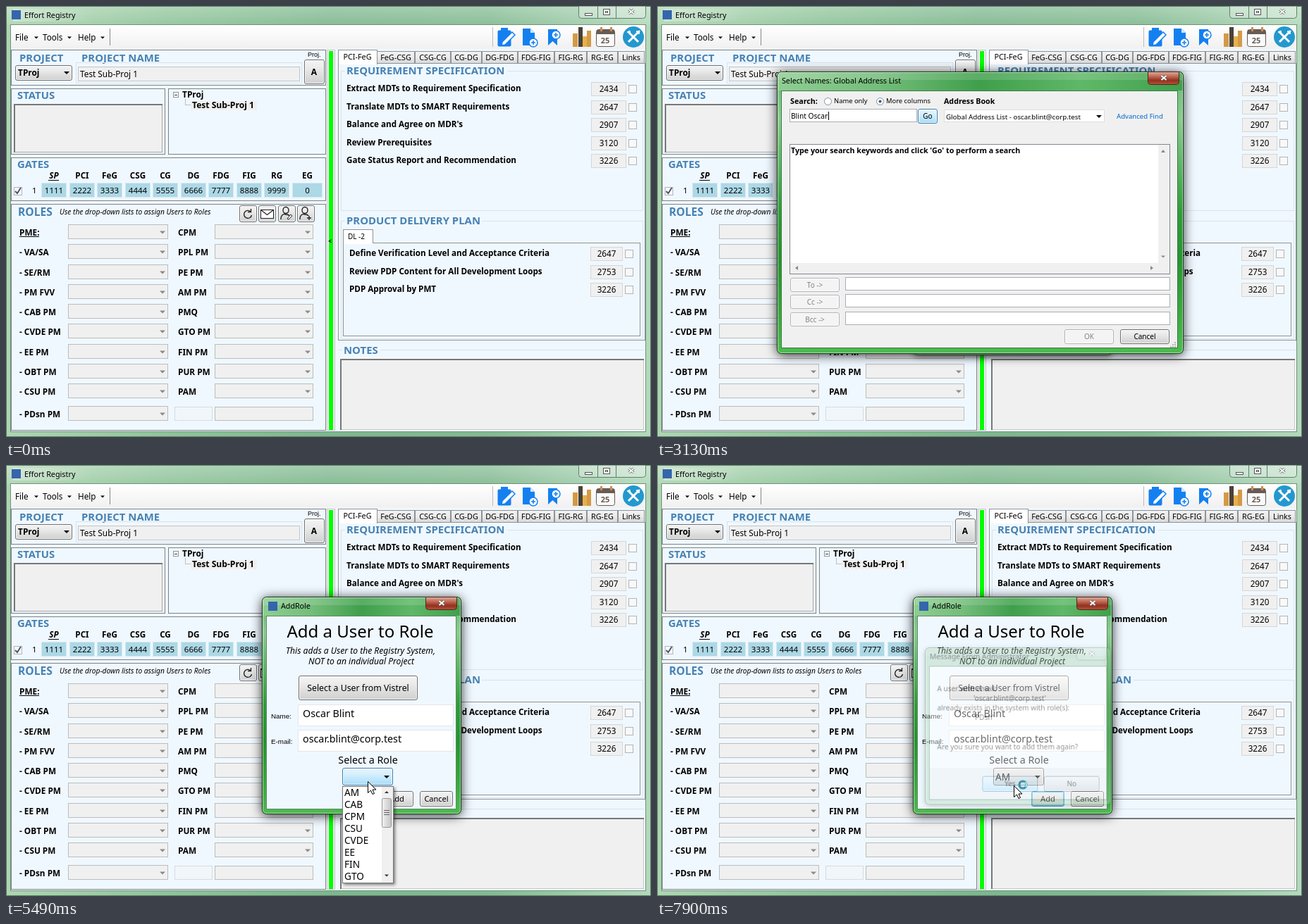
Write an HTML page with a canvas that moves like this. It is 915 px wide and 612 px high and loops after 7.99 s.

```html
<!DOCTYPE html>
<html lang="en">
<head>
<meta charset="utf-8">
<title>Effort Registry</title>
<style>
html, body { margin: 0; width: 100%; height: 100%; overflow: hidden; }
canvas { display: block; }
</style>
</head>
<body>
<canvas id="stage" width="915" height="612"></canvas>
<script>
const W = 915, H = 612, LOOP = 7990;
const stage = document.getElementById('stage').getContext('2d');
const layer = new OffscreenCanvas(W, H).getContext('2d');
let c = stage;

const NAME = 'Oscar Blint', SEARCH = 'Blint Oscar', MAIL = 'oscar.blint@corp.test';
const BLUE = '#4682b4', ALICE = '#f0f8ff', GRAY = '#f0f0f0';
const clamp = v => Math.max(0, Math.min(1, v));
const ramp = (t, from, to) => clamp((t - from) / (to - from));

// ---------- drawing helpers ----------
function box(x, y, w, h, fill, line) {
  if (fill) { c.fillStyle = fill; c.fillRect(x, y, w, h); }
  if (line) { c.strokeStyle = line; c.lineWidth = 1; c.strokeRect(x + .5, y + .5, w - 1, h - 1); }
}
function round(x, y, w, h, r, fill, line) {
  c.beginPath();
  c.roundRect(x + .5, y + .5, w - 1, h - 1, r);
  if (fill) { c.fillStyle = fill; c.fill(); }
  if (line) { c.strokeStyle = line; c.lineWidth = 1; c.stroke(); }
}
function path(d, x, y, fill, line, width = 1) {
  const p = new Path2D(d);
  c.save();
  c.translate(x, y);
  if (fill) { c.fillStyle = fill; c.fill(p); }
  if (line) { c.strokeStyle = line; c.lineWidth = width; c.stroke(p); }
  c.restore();
}
// y is the middle of the capitals
function text(s, x, y, size, style = '', color = '#000', align = 'left', family = '"Noto Sans"') {
  c.font = `${style} ${size}px ${family}, sans-serif`;
  c.fillStyle = color;
  c.textAlign = align;
  c.fillText(s, x, y + size * .36);
}
const bold = (s, x, y, size = 11.7, color, align) => text(s, x, y, size, 'bold', color, align);
const mid = (s, x, y, size, style, color) => text(s, x, y, size, style, color, 'center');
const head = (s, x, y, size = 14.9) => bold(s, x, y, size, BLUE);

function shade(x0, y0, x1, y1, colors) {
  const g = c.createLinearGradient(x0, y0, x1, y1);
  colors.forEach((col, i) => g.addColorStop(i / (colors.length - 1), col));
  return g;
}
const down = (x, y, s = 4, color = '#000') => path(`M${-s} 0H${s}L0 ${s}Z`, x, y - s / 2, color);
const check = (x, y) => box(x, y, 12, 12, '#f8f8f8', '#b4b4b4');

const TONES = {
  normal: [['#f4f4f4', '#ebebeb', '#dcdcdc', '#cfcfcf'], '#707070'],
  focus: [['#f4f4f4', '#ebebeb', '#dcdcdc', '#cfcfcf'], '#3c9fd1'],
  hot: [['#eaf6fd', '#d9f0fc', '#bee6fd', '#a7d9f5'], '#3c7fb1'],
  off: [['#f4f4f4', '#f4f4f4'], '#b2b5b8']
};
function button(x, y, w, h, label, size, tone = 'normal') {
  const [fill, line] = TONES[tone];
  round(x, y, w, h, 2.5, shade(0, y, 0, y + h, fill), line);
  round(x + 1, y + 1, w - 2, h - 2, 2, null, tone == 'focus' ? '#4cc4ee' : 'rgba(255,255,255,.75)');
  if (label) mid(label, x + w / 2, y + h / 2, size, '', tone == 'off' ? '#838383' : '#000');
}
function combo(x, y, w, h = 21) {
  box(x, y, w, h, GRAY, '#bcbcbc');
  down(x + w - 8, y + h / 2 + 1, 4, '#8a8a8a');
}
function cross(x, y, color) {
  path('M-3.5 -3L3.5 3M3.5 -3L-3.5 3', x, y, null, '#555', 3.4);
  path('M-3.5 -3L3.5 3M3.5 -3L-3.5 3', x, y, null, color, 2);
}

// ---------- main window ----------
function toolbar() {
  const blue = '#1480f0';
  round(697, 34, 20, 24, 2, blue);
  box(702, 31, 10, 5, blue);
  path('M0 0L14 -14L18 -10L4 4L-1 5Z', 704, 51, '#fff', blue, 1.5);
  path('M0 0H11L17 6V24H0Z', 733, 32, blue);
  path('M11 0V6H17Z', 733, 32, '#cfe6ff');
  const plus = (x, y) => {
    path('M6 0A6 6 0 1 1 -6 0A6 6 0 1 1 6 0', x, y, '#fff', blue, 1.5);
    path('M-3 0H3M0 -3V3', x, y, null, blue, 1.6);
  };
  plus(748, 52);
  path('M0 0H13V23L6.5 17L0 23Z', 769, 33, blue);
  plus(780, 41);
  box(804, 39, 7, 19, '#d49a45');
  box(812, 30, 6, 28, '#4a4138');
  box(818, 43, 6, 15, '#e6b04c');
  box(824, 35, 6, 23, '#d49a45');
  round(837, 33, 27, 25, 3, '#fafafa', '#665c55');
  box(838, 34, 25, 6, '#665c55');
  for (const x of [843, 857]) box(x, 30, 3, 6, '#d08a50');
  mid('25', 850, 49, 11, 'bold', '#665c55');
  path('M15 0A15 15 0 1 1 -15 0A15 15 0 1 1 15 0', 890, 44, '#2398cf');
  path('M-7 7L6 -6M-6 -6L7 7', 890, 44, null, '#fff', 3);
  path('M-9 -7L-5 -9L-4 -4ZM4 -8L9 -9L8 -4Z', 890, 44, '#fff', '#fff', 1);
}

function shell(active) {
  box(0, 0, W, H, shade(0, 0, W, 0, ['#aed5b2', '#8fc49a', '#7db78d', '#82ba91', '#b4d9bc']));
  box(0, 0, W, 27, shade(0, 0, 0, 27, ['rgba(255,255,255,.3)', 'rgba(255,255,255,.08)']));
  box(10, 4, 110, 18, shade(10, 0, 125, 0, ['rgba(255,255,255,.3)', 'rgba(255,255,255,0)']));
  if (active) box(0, 0, W, H, `rgba(30,140,45,${.4 * active})`);
  box(0, 0, W, H, null, '#587963');
  box(6, 26, 902, 579, ALICE, '#6f9279');
  box(8, 6, 13, 13, '#3565ac');
  text('Effort Registry', 26, 13, 10.8);
  round(812, -4, 96, 22, 4, 'rgba(255,255,255,.28)', '#60806a');
  if (active) box(866, 0, 41, 17, `rgba(190,65,45,${active})`);
  path('M27 0V17M53 0V17', 812.5, 0, null, '#60806a');
  box(821, 10, 11, 4, '#fff', '#555');
  box(847, 4, 10, 9, '#fff', '#555');
  box(850, 7, 4, 3, null, '#555');
  cross(887, 8, '#fff');

  box(7, 27, 900, 34, shade(0, 27, 0, 61, ['#fff', '#f8f8f8', '#f0f0f0']));
  [['File', 13, 43], ['Tools', 52, 90], ['Help', 102, 137]].forEach(([s, x, a]) => {
    text(s, x, 45, 11.7);
    down(a, 45, 3);
  });
  box(147, 32, 1, 24, '#888');
  box(690, 30, 1, 28, '#bbb');
  toolbar();
}

function leftSide(hover) {
  const line = '#7c8288';
  box(7, 62, 447, 51, null, line);
  head('PROJECT', 19, 74);
  head('PROJECT NAME', 107, 74);
  button(13, 84, 81, 22);
  bold('TProj', 17, 95, 11.9);
  down(86, 95);
  box(99, 80, 321, 30, null, '#dbe3ea');
  box(102, 86, 315, 21, GRAY, '#c5c5c5');
  text('Test Sub-Proj 1', 105, 97, 11.8);
  text('Proj.', 428, 69, 9, '', '#000', 'left', '"Liberation Sans"');
  button(423, 76, 29, 35);
  bold('A', 437, 94, 12, '#000', 'center');

  box(7, 117, 219, 94, null, line);
  head('STATUS', 16, 127);
  box(11, 139, 211, 69, GRAY, '#a5a5a5');
  box(11, 139, 211, 2, '#777');
  box(11, 139, 2, 69, '#777');
  box(230, 117, 224, 94, ALICE, line);
  box(237, 122, 8, 8, '#fff', '#929292');
  box(239, 126, 4, 1, '#333');
  bold('TProj', 250, 126, 11.9);
  c.setLineDash([1, 1]);
  path('M0 0V8H7', 254.5, 132.5, null, '#888');
  c.setLineDash([]);
  box(262, 135, 94, 13, GRAY);
  bold('Test Sub-Proj 1', 264, 141, 12.1);

  box(7, 215, 447, 62, null, line);
  head('GATES', 16, 225);
  check(11, 257);
  path('M0 3L3 6L8 -2', 13, 260, null, '#40506a', 1.8);
  text('1', 37, 262, 11.5);
  'SP PCI FeG CSG CG DG FDG FIG RG EG'.split(' ').forEach((s, i) => {
    const x = Math.round(50 + i * 39.55), w = i == 9 ? 43 : 36;
    mid(s, x + w / 2, 241, 11.7, i ? 'bold' : 'italic bold');
    if (!i) box(60, 247, 15, 1, '#000');
    box(x, 251, w, 21, '#add8e6', '#d3e9f1');
    mid(i == 9 ? '0' : String(i + 1).repeat(4), x + w / 2, 262, 11.5);
  });

  box(7, 281, 447, 322, null, line);
  head('ROLES', 17, 292, 15.6);
  text('Use the drop-down lists to assign Users to Roles', 76, 292, 10.2, 'italic');
  for (let i = 0; i < 4; i++) button(Math.round(331 + i * 27.3), 283, 25, 24, '', 0, hover == i ? 'hot' : 'normal');
  path('M4 -3A5.5 5.5 0 1 0 5.5 2M4.5 -7V-2.5H0', 343, 295, null, '#222', 1.4);
  box(361, 289, 19, 13, '#fff', '#222');
  path('M0 0L9 7L18 0', 361.5, 289.5, null, '#222', 1.2);
  for (const x of [397, 424])
    path('M4 -4A4 4.5 0 1 1 -4 -4A4 4.5 0 1 1 4 -4M-7 9C-7 2 -3 1 0 2C2 2 4 2 5 4', x, 294, null, '#222', 1.4);
  path('M0 6L5 0L7 2L2 7Z', 399, 296, '#fff', '#222');
  path('M0 3H6M3 0V6', 427, 298, null, '#222', 1.4);

  const left = ['PME:', 'VA/SA', 'SE/RM', 'PM FVV', 'CAB PM', 'CVDE PM', 'EE PM', 'OBT PM', 'CSU PM', 'PDsn PM'];
  const right = ['CPM', 'PPL PM', 'PE PM', 'AM PM', 'PMQ', 'GTO PM', 'FIN PM', 'PUR PM', 'PAM'];
  left.forEach((s, i) => {
    const y = Math.round(321 + i * 28.25) + (i == 9 ? 4 : 0);
    bold(i ? '- ' + s : s, 19, y + 1, 11.8);
    combo(88, y - 11, 142);
    if (i < 9) {
      bold(right[i], 244, y + 1, 11.8);
      combo(296, y - 11, 140);
    }
  });
  box(19, 327, 28, 1, '#000');
  box(239, 569, 54, 20, '#f1f6fb', '#d5dce2');
  box(296, 569, 140, 20, GRAY, '#bcbcbc');

  box(455, 62, 12, 541, '#f4f4f4', '#c4c4c4');
  box(458, 64, 6, 538, '#00ff00');
  bold('<', 457, 334, 9);
}

function task(label, value, x, y, boxX, boxY, w) {
  bold(label, x, y, 11.65);
  box(boxX, boxY - 10, w, 20, GRAY, '#d6d6d6');
  mid(value, boxX + w / 2, boxY, 11.7);
  check(boxX + w + 3, boxY - 6);
}

function rightSide() {
  box(471, 81, 436, 394, ALICE, '#8d9399');
  const tabs = ['PCI-FeG', 'FeG-CSG', 'CSG-CG', 'CG-DG', 'DG-FDG', 'FDG-FIG', 'FIG-RG', 'RG-EG', 'Links'];
  const edges = [471, 526, 580, 631, 675, 726, 778, 824, 868, 906];
  tabs.forEach((s, i) => {
    const x = edges[i], w = edges[i + 1] - x;
    if (i) box(x, 64, w, 18, shade(0, 64, 0, 82, ['#f3f3f3', '#ebebeb', '#d6d6d6']), '#8d9399');
    else {
      box(x, 62, w + 1, 21, '#fff', '#8d9399');
      box(x + 1, 81, w - 1, 2, '#fff');
    }
    mid(s, x + w / 2, i ? 73 : 72, 10.8);
  });
  box(475, 92, 429, 199, null, '#dbe3ea');
  box(481, 86, 230, 12, ALICE);
  head('REQUIREMENT SPECIFICATION', 483, 92);
  [['Extract MDTs to Requirement Specification', 2434], ['Translate MDTs to SMART Requirements', 2647],
   ["Balance and Agree on MDR's", 2907], ['Review Prerequisites', 3120],
   ['Gate Status Report and Recommendation', 3226]].forEach(([s, n], i) =>
    task(s, n, 483, 117 + i * 25.5, 830, Math.round(118 + i * 25.5), 50));

  box(475, 305, 429, 168, null, '#dbe3ea');
  box(481, 299, 194, 12, ALICE);
  head('PRODUCT DELIVERY PLAN', 483, 305);
  box(478, 336, 422, 133, ALICE, '#8d9399');
  box(478, 317, 43, 20, '#fff', '#8d9399');
  box(479, 335, 41, 3, '#fff');
  mid('DL -2', 497, 327, 10);
  [['Define Verification Level and Acceptance Criteria', 2647],
   ['Review PDP Content for All Development Loops', 2753], ['PDP Approval by PMT', 3226]].forEach(([s, n], i) =>
    task(s, n, 487, 351 + i * 25.5, 829, Math.round(352 + i * 25.5), 46));

  box(472, 488, 434, 1, '#dbe3ea');
  box(477, 483, 54, 12, ALICE);
  head('NOTES', 479, 489);
  box(474, 501, 431, 101, GRAY, '#c8c8c8');
  box(474, 501, 431, 2, '#777');
  box(474, 501, 2, 101, '#777');
}

// ---------- pop-up windows ----------
function frame(x, y, w, h, title, active, closeTone, icon) {
  c.save();
  c.beginPath();
  c.rect(0, 0, W, H);
  c.roundRect(x, y, w, h, 6);
  c.clip('evenodd');
  c.shadowColor = active ? 'rgba(0,0,0,.85)' : 'rgba(0,0,0,.5)';
  c.shadowBlur = active ? 16 : 9;
  c.shadowOffsetY = 2;
  round(x, y, w, h, 6, '#000');
  c.restore();

  c.save();
  c.beginPath();
  c.roundRect(x, y, w, h, 6);
  c.clip();
  c.filter = 'blur(2px)';
  c.drawImage(stage.canvas, x, y, w, h, x, y, w, h);
  c.filter = 'none';
  const tint = active ? ['#67b873', '#8bcc8f', '#5cb565', '#2f9c38', '#279331', '#37a63c', '#4fbb50']
                      : ['rgba(150,198,155,.8)', 'rgba(165,210,170,.8)', 'rgba(160,206,167,.8)'];
  box(x, y, w, h, shade(0, y, 0, y + h, tint));
  if (active) box(x, y, w, 27, shade(x, 0, x + w, 0, ['#8fce93', '#74bd7b', '#3f9f4b', '#5fb868', '#3f9f4b']));
  box(x, y, w, 12, 'rgba(255,255,255,.14)');
  c.restore();
  round(x, y, w, h, 6, null, active ? '#16381c' : '#4f6f57');
  round(x + 1, y + 1, w - 2, h - 2, 5, null, 'rgba(225,255,225,.6)');

  if (icon) box(x + 9, y + 7, 13, 13, '#3565ac');
  text(title, x + (icon ? 27 : 7), y + 13, 10.7);
  const cx = x + w - 51, red = ['#dfb0a0', '#c4705c', '#93301f', '#b9573d'];
  const fills = { red, tan: ['#c9c09a', '#b09a72', '#98794f', '#b59a70'], clear: ['rgba(255,255,255,.35)', 'rgba(255,255,255,.1)'] };
  round(cx, y, 45, 19, [0, 0, 4, 4], shade(0, y, 0, y + 19, fills[closeTone]), closeTone == 'clear' ? '#6d8d73' : '#4b2a20');
  cross(cx + 23, y + 9, closeTone == 'tan' ? '#ddd6c0' : '#fff');
}

function addRole(s) {
  frame(363, 187, 283, 309, 'AddRole', s.active, s.active ? 'red' : 'clear', true);
  box(369, 214, 270, 275, ALICE, '#5d8a63');
  mid('Add a User to Role', 502.5, 236, 24);
  mid('This adds a User to the Registry System,', 503, 264, 12.1, 'italic');
  mid('NOT to an individual Project', 504, 279, 12.1, 'italic');
  button(415, 299, 169, 35, 'Select a User from Vistrel', 12.3, s.pick);
  [['Name:', 356, s.filled && NAME], ['E-mail:', 392, s.filled && MAIL]].forEach(([label, y, value]) => {
    text(label, 376, y, 9.8, '', '#000', 'left', '"Liberation Sans"');
    box(414, y - 16, 221, 31, '#fff', '#e2e6ea');
    if (value) text(value, 421, y - 3, 14.3);
  });
  mid('Select a Role', 513.5, 419, 14.3);
  button(477, 430, 72, 25, '', 0, s.open ? 'hot' : 'normal');
  if (s.role) text('AM', 480, 443, 13.6);
  down(540, 443);
  button(531, 463, 47, 22, 'Add', 11.2, s.add);
  button(587, 463, 47, 22, 'Cancel', 11);
  if (s.open) roleList(s.over);
}

function roleList(over) {
  c.save();
  c.shadowColor = 'rgba(0,0,0,.5)';
  c.shadowBlur = 4;
  c.shadowOffsetX = c.shadowOffsetY = 2;
  box(477, 456, 73, 138, '#fff');
  c.restore();
  box(477, 456, 73, 138, null, '#777');
  if (over) box(478, 457, 55, 16, '#3399ff');
  'AM CAB CPM CSU CVDE EE FIN GTO'.split(' ').forEach((s, i) =>
    text(s, 480, 465 + i * 17, 13.6, '', over && !i ? '#fff' : '#000'));
  box(533, 457, 16, 136, GRAY);
  round(533, 473, 14, 42, 2, shade(533, 0, 547, 0, ['#f5f5f5', '#dadada', '#c4c4c4']), '#979797');
  for (const y of [490, 493, 496]) box(536, y, 8, 1, '#666');
  path('M-3 2H3L0 -1Z', 540, 464, '#333');
  down(540, 583, 3, '#333');
}

function addressBook(t) {
  const found = t > 3230, chosen = t > 3450;
  frame(170, 93, 577, 401, 'Select Names: Global Address List', true, 'red');
  box(176, 120, 563, 366, GRAY, '#3d7a45');
  bold('Search:', 189, 135, 10.7);
  [['Name only', 242], ['More columns', 316]].forEach(([s, x], i) => {
    round(x - 5, 130, 11, 11, 5.5, '#fff', '#8a8f94');
    if (i) round(x - 2, 133, 5, 5, 2.5, '#2a5b9c');
    text(s, x + 9, 135, 9.4);
  });
  bold('Address Book', 407, 135, 10.7);
  box(188, 146, 181, 19, '#fff', '#abadb3');
  const typed = SEARCH.slice(0, Math.max(0, Math.floor((t - 2100) / 93)));
  text(typed, 190, 156, 10.2);
  if (!found) box(Math.round(191 + c.measureText(typed).width), 150, 1, 12, '#000');
  button(370, 146, 28, 21, 'Go', 10, 'hot');
  box(407, 147, 228, 18, '#fff', '#dedede');
  text('Global Address List - ' + MAIL, 410, 157, 9.75);
  down(627, 157);
  text('Advanced Find', 652, 157, 9.6, '', '#0066cc');

  box(188, 196, 540, 185, '#fff', '#828790');
  if (found) {
    box(189, 198, 521, 15, '#3399ff');
    text(SEARCH, 191, 205, 10, '', '#fff');
    text(MAIL, 420, 205, 9.75, '', '#fff');
  } else bold("Type your search keywords and click 'Go' to perform a search", 190, 205, 10.7);
  box(711, 197, 16, 183, GRAY);
  box(189, 365, 538, 15, GRAY);
  path('M-3 2H3L0 -2Z', 718, 206, '#888');
  down(718, 356, 3, '#888');
  path('M2 -3V3L-2 0Z', 198, 372, '#888');
  path('M-2 -3V3L2 0Z', 702, 372, '#888');
  ['To ->', 'Cc ->', 'Bcc ->'].forEach((s, i) => {
    const y = Math.round(386 + i * 24.4);
    button(189, y, 70, 20, s, 10, found ? 'normal' : 'off');
    box(267, y - 1, 461, 19, '#fff', '#abadb3');
    if (!i && chosen) text(SEARCH, 270, y + 9, 10);
  });
  button(578, 459, 70, 21, 'OK', 10, chosen ? 'focus' : 'off');
  button(657, 459, 70, 21, 'Cancel', 10);
  for (let i = 0; i < 6; i++) box(734 - [0, 3, 6, 0, 3, 0][i], 483 - [0, 0, 0, 3, 3, 6][i], 2, 2, '#b5b5b5');
}

function message(active, hover) {
  frame(376, 255, 272, 230, 'Message From Administrator', active, active ? 'tan' : 'clear');
  box(382, 282, 260, 196, '#fff', '#4c8553');
  box(383, 431, 258, 46, GRAY);
  text('A user with email:', 394, 315, 10.4);
  text(`'${MAIL}'`, 447, 329, 10.4);
  text('already exists in the system with role(s):', 394, 343, 10.4);
  text("'PDsn'", 447, 357, 10.4);
  text('Are you sure you want to add them again?', 394, 400, 10.4);
  button(460, 443, 81, 23, 'Yes', 10.4, hover ? 'hot' : 'focus');
  button(550, 443, 81, 23, 'No', 10.4);
}

// Draws a window on its own layer, then lays it down faded and shrunk about (x, y)
function popup(show, x, y, draw) {
  if (show <= 0) return;
  c = layer;
  c.clearRect(0, 0, W, H);
  draw();
  c = stage;
  const k = .95 + .05 * show;
  c.save();
  c.globalAlpha = show;
  c.translate(x, y);
  c.scale(k, k);
  c.drawImage(layer.canvas, -x, -y);
  c.restore();
}

// ---------- pointer ----------
const MOVES = [
  [130, 714, 541], [740, 398, 296], [905, 422, 299], [3200, 330, 330], [3450, 222, 400], [3600, 211, 418],
  [4380, 610, 136], [4930, 513, 449], [5490, 513, 449], [5700, 497, 464], [5860, 497, 464],
  [6150, 560, 475], [6580, 560, 475], [6720, 506, 455], [LOOP, 506, 455]
];
function pointer(t) {
  const i = MOVES.findIndex(m => m[0] > t);
  if (i < 1) return MOVES[0].slice(1);
  const [t0, x0, y0] = MOVES[i - 1], [t1, x1, y1] = MOVES[i];
  const p = (t - t0) / (t1 - t0), e = p * p * (3 - 2 * p);
  return [x0 + (x1 - x0) * e, y0 + (y1 - y0) * e];
}
function drawPointer(t, x, y) {
  if (t < 130 || (t > 1800 && t < 3200) || (t > 3820 && t < 4380)) return;
  if (t < 1290 || t > 1800) path('M0 0V16L4 12.5L6.5 18L9 17L6.5 11.5H11.5Z', x + .5, y + .5, '#fff', '#000');
  else path('M-1.5 11V1.5Q0 -1 1.5 1.5V7Q4 5.5 5 7.5Q7 6.5 8 8.5Q10.5 8 10.5 11V14L8.5 20H0L-4.5 12Q-5 9 -1.5 12Z',
    422.5, 300.5, '#fff', '#000', 1.2);
  if (t > 7720) {
    path('M5 0A5 5 0 1 1 -5 0A5 5 0 1 1 5 0', x + 13, y - 1, null, '#3d93a8', 3.2);
    c.save();
    c.translate(x + 13, y - 1);
    c.rotate(t / 160);
    path('M5 0A5 5 0 0 1 0 5', 0, 0, null, '#a5dce8', 2.4);
    c.restore();
  }
}

// ---------- timeline ----------
function render(t) {
  c = stage;
  const [x, y] = pointer(t);
  const onButtons = t < 1290 && t > 130 && y < 307 && x > 386 && x < 439;
  shell(t < 1290 ? ramp(t, 960, 1140) : 0);
  leftSide(onButtons ? (x < 411 ? 2 : 3) : -1);
  rightSide();

  popup(ramp(t, 1270, 1500), 504, 341, () => addRole({
    active: t < 1790 || (t >= 4900 && t < 6290) || t >= 7730,
    filled: t > 3800,
    pick: t < 1790 ? 'hot' : t < 5180 ? 'focus' : 'normal',
    open: t >= 5180 && t < 5860,
    over: t > 5600,
    role: t >= 5860,
    add: t < 6000 ? 'normal' : t < 6290 ? 'hot' : 'focus'
  }));
  popup(Math.min(ramp(t, 1780, 2000), 1 - ramp(t, 3780, 4070)), 458, 293, () => addressBook(t));
  popup(Math.min(ramp(t, 6280, 6480), 1 - ramp(t, 7690, 8050)), 512, 395, () => message(t < 7730, t >= 6720));
  drawPointer(t, x, y);
}

const start = performance.now();
(function tick() {
  render((performance.now() - start) % LOOP);
  requestAnimationFrame(tick);
})();
</script>
</body>
</html>
```
